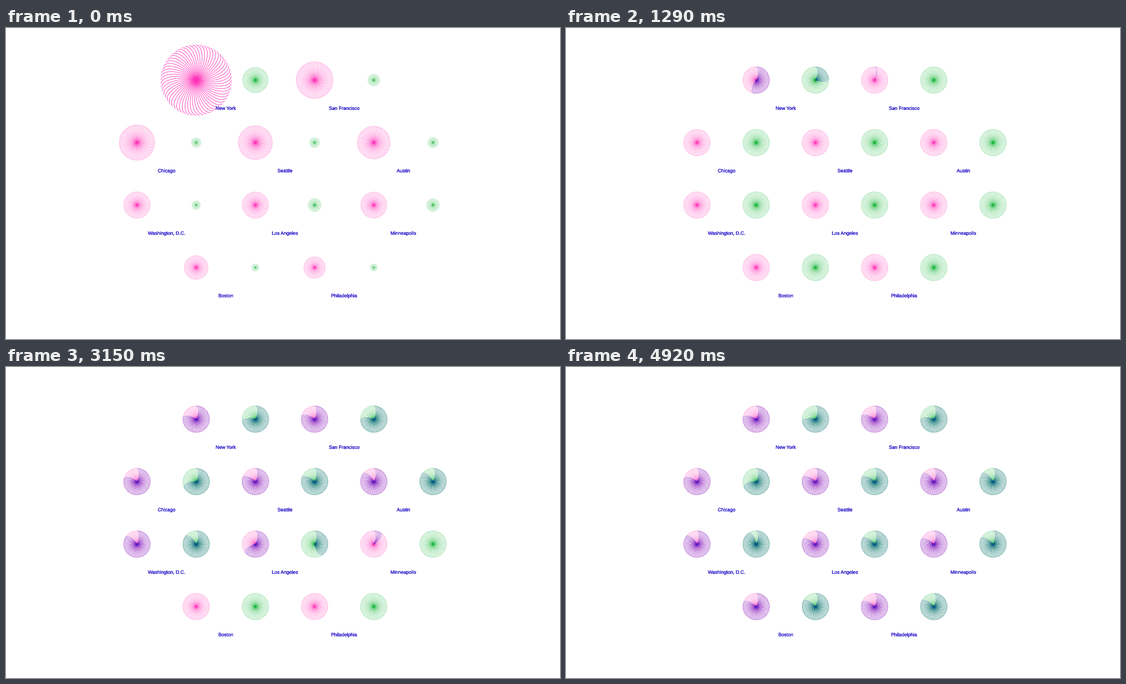
Write a matplotlib script that moves like this. It is 998x561 px and loops after 4980 ms.

```python
import numpy as np
import matplotlib.pyplot as plt
from matplotlib.animation import FuncAnimation
from matplotlib.collections import LineCollection
from matplotlib.patheffects import withStroke

W, H, DPI = 998, 561, 64
PT = 72 / DPI                     # points per pixel
STEP, FRAMES = 30, 166
ARMS, FULL, STROKE = 60, 24.3, .0132
PINK, GREEN = "#ff2fb8", "#0db431"
ON_PINK, ON_GREEN = "#451cc6", "#0a4c98"
INK = "#3322cc"

ROWS = [
    ["New York", "San Francisco"],
    ["Chicago", "Seattle", "Austin"],
    ["Washington, D.C.", "Los Angeles", "Minneapolis"],
    ["Boston", "Philadelphia"],
]
MID_X, TOP_Y, COL, ROW = 502.6, 94, 213.3, 112.7


def pink_size(i):
    return np.interp(i, [0, 1, 4, 5, 7, 9], [63.6, 33.4, 29.8, 24.2, 23.8, 19.8])


def green_size(i):
    return np.interp(i, [0, 1, 2, 4, 5, 6, 7, 8], [23.2, 11, 9, 9.7, 8, 12, 11.7, 6.8])


def pink_share(i):
    return np.interp(i, [0, 3, 4, 5, 6], [.79, .81, .86, .86, .81])


def green_share(i):
    return np.interp(i, [0, 1, 2, 3, 5, 6], [.74, .755, .70, .82, .915, .83])


def unit_arms():
    """Hooked arms of a fan with radius 1, clockwise from the top."""
    t = np.linspace(0, 1, 14)
    a, b, c = 3 * t * (1 - t) ** 2, 3 * t ** 2 * (1 - t), t ** 3
    along = .34 * a + .95 * b + c
    side = .20 * a + .25 * b
    th = (2 * np.pi * np.arange(ARMS) / ARMS)[:, None]
    x = along * np.sin(th) + side * np.cos(th)
    y = -along * np.cos(th) + side * np.sin(th)
    return np.stack([x, y], axis=-1)


ARM = unit_arms()


def settle(ms):
    """Part of the first size difference that is still left."""
    return np.exp(-.004035 * ms - 1.415e-6 * ms ** 2) if ms < 960 else 0


def sweep(age):
    return 1 - np.exp(-(age / 305) ** 1.8) if age > 0 else 0


class Fan:
    def __init__(self, ax, x, y, first, share, start, color, over):
        self.center = np.array([x, y])
        self.first, self.start = first, start
        self.count = round(share * ARMS)
        self.base = LineCollection([], colors=color, zorder=1)
        self.fill = LineCollection([], colors=over, zorder=2,
                                   linewidths=STROKE * FULL * PT)
        ax.add_collection(self.base, autolim=False)
        ax.add_collection(self.fill, autolim=False)

    def update(self, ms):
        r = FULL + (self.first - FULL) * settle(ms)
        arms = self.center + r * ARM
        self.base.set_segments(arms)
        self.base.set_linewidth(STROKE * r * PT)
        n = int(sweep(ms - self.start) * (self.count + .1))
        self.fill.set_segments(arms[:n])


fig = plt.figure(figsize=(W / DPI, H / DPI), dpi=DPI, facecolor="white")
ax = fig.add_axes([0, 0, 1, 1])
ax.set_xlim(0, W)
ax.set_ylim(H, 0)
ax.axis("off")

fans = []
for row, names in enumerate(ROWS):
    y = TOP_Y + ROW * row
    for col, name in enumerate(names):
        i = len(fans) // 2
        x = MID_X + COL * (col - (len(names) - 1) / 2)
        start = 950 + 300 * i
        fans.append(Fan(ax, x - COL / 4, y, pink_size(i), pink_share(i),
                        start, PINK, ON_PINK))
        fans.append(Fan(ax, x + COL / 4, y, green_size(i), green_share(i),
                        start + 150, GREEN, ON_GREEN))
        ax.text(x, y + 53.6, name, color=INK, family="Liberation Sans",
                size=8.65 * PT, ha="center", va="baseline", zorder=3,
                path_effects=[withStroke(linewidth=.25 * PT, foreground=INK)])


def draw(frame):
    for fan in fans:
        fan.update(frame * STEP)
    return []


anim = FuncAnimation(fig, draw, frames=FRAMES, interval=STEP,
                     repeat=True, repeat_delay=0, blit=False)
plt.show()
```
